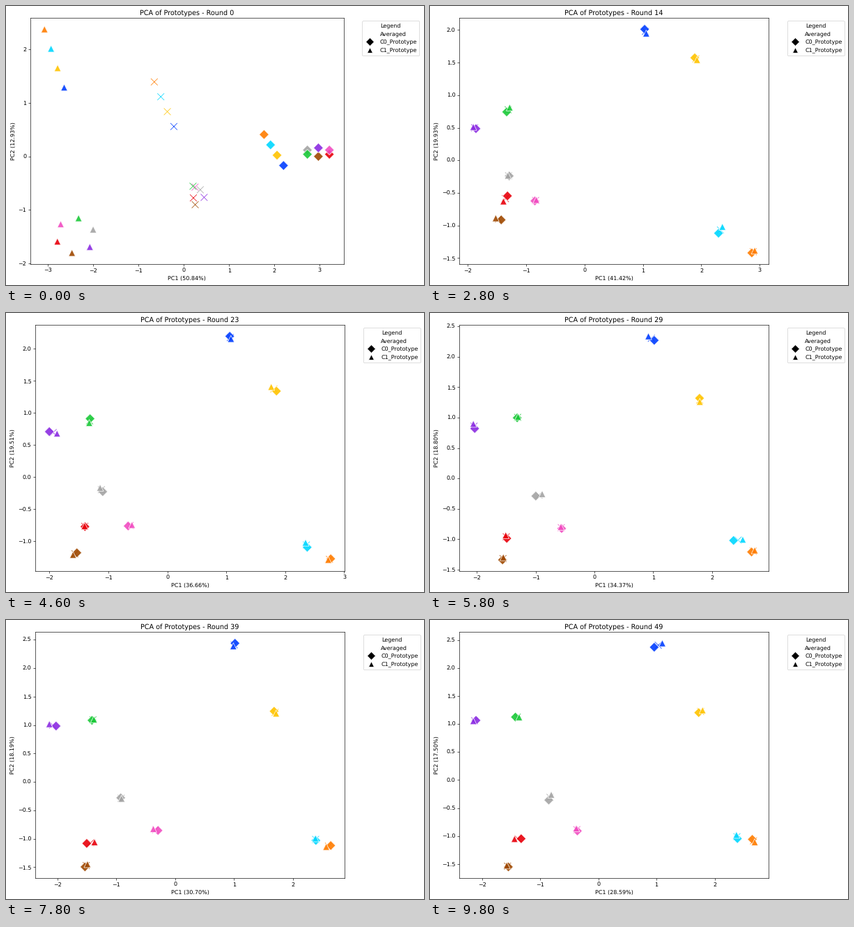
Recreate the animation shown at these times as a matplotlib script. Size 600x400 px, loop 10000 ms.

```python
import numpy as np
import matplotlib.pyplot as plt
from matplotlib.animation import FuncAnimation
from matplotlib.lines import Line2D

plt.rcParams["font.family"] = "DejaVu Sans"
plt.rcParams["text.hinting"] = "none"

W, H, DPI = 600, 400, 57.6
ROUNDS, STEP_MS = 50, 200
SETTLED = 8          # round by which both classes of a client have met

# client: colour, home once settled, home at the end (bottom to top)
CLIENTS = {
    "orange": ("#FF7C00", (2.89, -1.49), (2.62, -1.10)),
    "cyan": ("#00D7FF", (2.37, -1.05), (2.38, -1.00)),
    "yellow": ("#FFC400", (1.96, 1.65), (1.72, 1.20)),
    "blue": ("#023EFF", (1.04, 1.89), (0.99, 2.42)),
    "grey": ("#A3A3A3", (-1.48, -0.19), (-0.85, -0.30)),
    "brown": ("#9F4800", (-1.56, -0.70), (-1.54, -1.55)),
    "red": ("#E8000B", (-1.30, -0.50), (-1.45, -1.08)),
    "purple": ("#8B2BE2", (-1.76, 0.32), (-2.15, 1.05)),
    "pink": ("#F14CC1", (-0.96, -0.56), (-0.35, -0.90)),
    "green": ("#1AC938", (-1.17, 0.67), (-1.40, 1.10)),
}
COLORS, EARLY, LATE = zip(*CLIENTS.values())
EARLY, LATE = np.array(EARLY), np.array(LATE)

# explained variance in percent
SHARE_ROUNDS = (0, 8, 14, 23, 35, 43, 49)
PC1_SHARE = (50.84, 46.97, 41.42, 36.66, 32.08, 29.32, 28.59)
PC2_SHARE = (12.93, 20.50, 19.93, 19.51, 18.10, 18.28, 17.50)


def line(names, a, b):
    """Spread clients evenly from a to b."""
    return dict(zip(names.split(), np.linspace(a, b, len(names.split()))))


def ring(names, center, radii, phase):
    """Spread clients evenly on an ellipse, counter-clockwise."""
    names = names.split()
    angle = np.radians(phase) + 2 * np.pi * np.arange(len(names)) / len(names)
    spots = np.array(center) + np.array(radii) * np.column_stack([np.cos(angle), np.sin(angle)])
    return dict(zip(names, spots))


FEW = "orange cyan yellow blue"
starts = [
    line(FEW, (1.77, 0.41), (2.20, -0.17))
    | ring("grey green brown red pink purple", (2.97, 0.08), (0.28, 0.08), 150),
    line(FEW, (-3.08, 2.38), (-2.645, 1.29))
    | ring("grey green pink red brown purple", (-2.40, -1.48), (0.42, 0.33), 20),
]
START = np.array([[group[name] for name in CLIENTS] for group in starts])


def positions(n):
    """Prototype positions after round n, shaped (class, client, axis)."""
    t = max(0, (n - SETTLED) / (ROUNDS - 1 - SETTLED))
    home = EARLY + (LATE - EARLY) * np.sin(np.pi / 2 * t)
    gap = np.random.default_rng(n).normal(0, (0.05, 0.03), START.shape)
    merge = min(1, (1 - np.exp(-3 * n / SETTLED)) / (1 - np.exp(-3)))
    pos = START + (home + gap - START) * merge
    pos[..., 1] *= 1 + 0.05 * t * np.cos(np.pi / 2 * n)   # growing PC2 swing
    return pos


def limits(v):
    pad = 0.05 * np.ptp(v)
    return v.min() - pad, v.max() + pad


def place(left, right, top=17.3, bottom=370):
    ax.set_position([left / W, 1 - bottom / H, (right - left) / W, (bottom - top) / H])


def layer(marker, **style):
    return ax.scatter(*START[0].T, s=150, marker=marker, c=COLORS,
                      alpha=0.9, linewidth=0.98, **style)


fig = plt.figure(figsize=(W / DPI, H / DPI), dpi=DPI, facecolor="white")
ax = fig.add_subplot()
layers = [layer("x"), layer("D", edgecolor="w"), layer("^", edgecolor="w")]

labels = {"Averaged": "x", "C0_Prototype": "D", "C1_Prototype": "^"}
handles = [Line2D([0], [0], marker=m, color="w", markerfacecolor="black",
                  markersize=10, label=name) for name, m in labels.items()]
ax.legend(handles=handles, title="Legend", loc="upper left", bbox_to_anchor=(1.05, 1))


def draw(n):
    pos = positions(n)
    for dots, xy in zip(layers, (pos.mean(axis=0), *pos)):
        dots.set_offsets(xy)
    ax.set_xlim(*limits(pos[..., 0]))
    low, high = limits(pos[..., 1])
    ax.set_ylim(low, high)
    # whole-number ticks need less room on the left
    if high - low > 4.5:
        place(34.8, 484.6)
    else:
        place(42, 486.3)
    ax.set_title(f"PCA of Prototypes - Round {n}")
    ax.set_xlabel(f"PC1 ({np.interp(n, SHARE_ROUNDS, PC1_SHARE):.2f}%)")
    ax.set_ylabel(f"PC2 ({np.interp(n, SHARE_ROUNDS, PC2_SHARE):.2f}%)")
    return layers


anim = FuncAnimation(fig, draw, frames=ROUNDS, interval=STEP_MS,
                     init_func=lambda: draw(0), repeat=True, repeat_delay=0)
plt.show()
```
